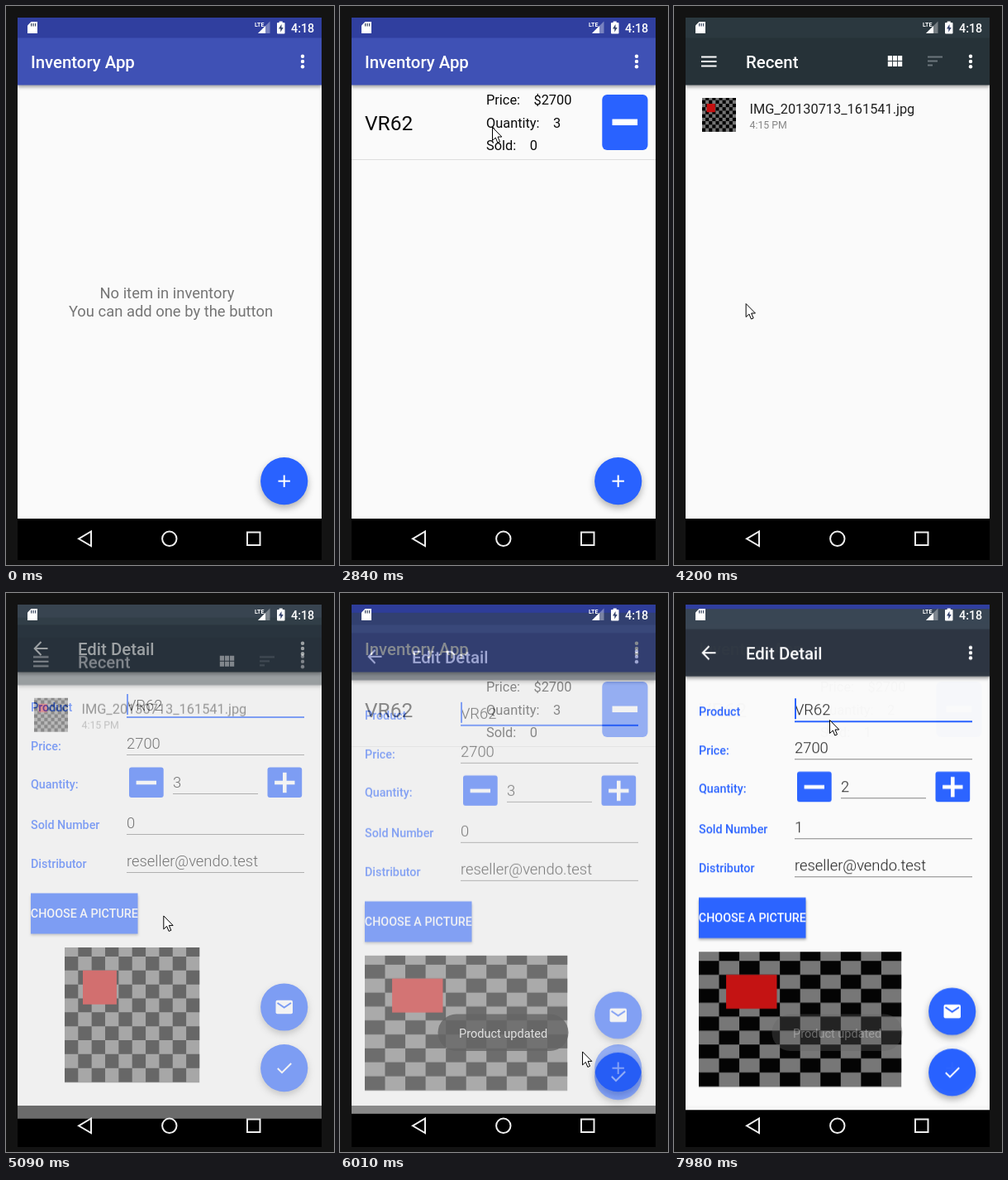
Recreate the animation shown at these times as an HTML page with a canvas. Size 397 px wide and 675 px high, loop 8000 ms.

```html
<!DOCTYPE html>
<html>
<head>
<meta charset="utf-8">
<style>
html, body { margin: 0; height: 100%; overflow: hidden; background: #131313; }
canvas { display: block; }
</style>
</head>
<body>
<canvas id="stage" width="397" height="675"></canvas>
<script>
const LOOP = 8000, BLUE = '#2962ff', PAPER = '#fafafa';
const ITEM = 'VR62', MAIL = 'reseller@vendo.test';
const stage = document.getElementById('stage').getContext('2d');
const buffer = document.createElement('canvas');
buffer.width = 397;
buffer.height = 675;
const layer = buffer.getContext('2d');
let g = stage;

const clamp = v => Math.max(0, Math.min(1, v));
const progress = (t, start, end) => clamp((t - start) / (end - start));
const easeOut = (k, power) => 1 - (1 - k) ** power;
const soldAt = t => t >= 7320 ? 1 : 0;

function rect(x, y, w, h, color, radius = 0) {
  g.fillStyle = color;
  g.beginPath();
  g.roundRect(x, y, w, h, radius);
  g.fill();
}

function disc(x, y, r, color) {
  rect(x - r, y - r, r * 2, r * 2, color, r);
}

function text(str, x, y, size, color, weight = 400, align = 'left') {
  g.font = `${weight} ${size}px Roboto, sans-serif`;
  g.fillStyle = color;
  g.textAlign = align;
  g.fillText(str, x, y);
  return g.measureText(str).width;
}

function fillPath(d, color) {
  g.fillStyle = color;
  g.fill(new Path2D(d));
}

function strokePath(d, color, width = 2) {
  g.strokeStyle = color;
  g.lineWidth = width;
  g.stroke(new Path2D(d));
}

function withShadow(blur, dy, alpha, draw) {
  g.save();
  g.shadowColor = `rgba(0,0,0,${alpha})`;
  g.shadowBlur = blur;
  g.shadowOffsetY = dy;
  draw();
  g.restore();
}

function fab(y) {
  withShadow(8, 4, .3, () => disc(336.7, y, 28.6, BLUE));
}

function minus(x, y, half, thick) {
  rect(x - half, y - thick / 2, half * 2, thick, '#fff');
}

function plus(x, y, half, thick) {
  minus(x, y, half, thick);
  minus(x, y, thick / 2, half * 2);
}

function frame(title, x, status, bar) {
  rect(14, 14, 368, 605, PAPER);
  withShadow(4, 2, .35, () => rect(14, 38, 368, 57.5, bar));
  rect(14, 14, 368, 24.5, status);
  text(title, x, 75, 20.4, '#fff', 500);
  for (let i = -1; i < 2; i++) disc(359, 67 + i * 6.3, 2.2, '#fff');
}

// Checkerboard with a red square; rows are slightly taller than columns
function picture(x, y, w, h) {
  g.save();
  g.beginPath();
  g.rect(x, y, w, h);
  g.clip();
  rect(x, y, w, h, '#757575');
  for (let r = 0; r < 10; r++)
    for (let c = 0; c < 10; c++)
      if ((r + c) % 2) rect(x + c * w / 10, y + (r * 1.03 - .36) * h / 10, w / 10, h * .103, '#000');
  rect(x + w * .135, y + h * .17, w * .25, h * .25, '#c41010');
  g.restore();
}

function listScreen(t) {
  frame('Inventory App', 30, '#303f9f', '#3f51b5');
  if (t < 1800) {
    text('No item in inventory', 195, 353, 18.4, '#757575', 400, 'center');
    text('You can add one by the button', 199.5, 375, 18.4, '#757575', 400, 'center');
  } else {
    const sold = soldAt(t);
    const details = { 'Price:': '$2700', 'Quantity:': 3 - sold, 'Sold:': sold };
    text(ITEM, 30, 150, 24.5, '#0a0a0a');
    Object.entries(details).forEach(([label, value], i) => {
      const y = 119 + i * 27.6;
      const width = text(label, 177, y, 16.35, '#0a0a0a');
      text(value, 177 + width + 16.5, y, 16.35, '#0a0a0a');
    });
    rect(317.3, 107, 55.2, 67, BLUE, 6);
    minus(344.8, 140.3, 15.3, 7.5);
    rect(14, 185, 368, 1, '#dedede');
  }
  fab(573.7);
  plus(336.7, 573.7, 7.2, 2);
}

function editForm(t) {
  const sold = soldAt(t);
  const fields = { Product: ITEM, 'Price:': 2700, 'Quantity:': 3 - sold, 'Sold Number': sold, Distributor: MAIL };
  let y = 143;
  for (const [label, value] of Object.entries(fields)) {
    const counter = label === 'Quantity:', focused = label === 'Product';
    const x = counter ? 202 : 146;
    text(label, 30, y, 14.3, BLUE, 500);
    text(value, x, y - 1.5, 18.4, '#1c1c1c', 300);
    rect(x, Math.round(y + 5.5), counter ? 103 : 215, focused ? 2 : 1, focused ? BLUE : '#858585');
    if (focused) rect(x, y - 21, 2, 25, BLUE);
    if (counter) {
      for (const left of [149, 316.5]) rect(left, y - 25.5, 41.7, 36.5, BLUE, 3);
      minus(169.8, y - 7, 12.2, 4.6);
      plus(337.3, y - 7, 12.2, 4.6);
    }
    y += counter ? 49 : 46.5;
  }
}

function editScreen(t) {
  frame('Edit Detail', 87, '#3a4753', '#2d3541');
  strokePath('M50.5 67H35M42.5 59L34.7 67L42.5 75', '#fff');
  editForm(t);
  withShadow(3, 2, .3, () => rect(30, 362.5, 129.5, 49, BLUE));
  text('CHOOSE A PICTURE', 94.8, 392.3, 14.3, '#fff', 500, 'center');
  const width = t >= 5850 ? 245.5 : 163.5;
  if (t >= 4930) picture(152.7 - width / 2, 428, width, 163.5);
  fab(500);
  rect(326.5, 491.8, 20.5, 16.4, '#fff', 2);
  strokePath('M328.5 495L336.7 500.5L345 495', BLUE);
  fab(573.7);
  strokePath('M328.8 574L334 579.2L345.2 568', '#fff');
}

function pickerScreen() {
  frame('Recent', 87, '#2b383f', '#263238');
  for (let i = 0; i < 3; i++) {
    rect(33, 60.5 + i * 5.5, 18.5, 2, '#fff');
    rect(307, 60.5 + i * 5, 18 - i * 6, 2, '#6c767c');
    for (let j = 0; j < 2; j++) rect(258.8 + i * 6.1, 60 + j * 7, 5.2, 6, '#fff');
  }
  picture(34, 111, 41, 41);
  text('IMG_20130713_161541.jpg', 91.5, 130, 16.35, '#212121');
  text('4:15 PM', 91.5, 148, 12.3, '#858585');
}

function menu(t) {
  const open = easeOut(progress(t, 1100, 1330), 2);
  const alpha = open * (1 - progress(t, 1700, 1840));
  if (!alpha) return;
  g.save();
  g.globalAlpha = alpha;
  g.beginPath();
  g.rect(388 - 220 * open, 34, 220, 24 + 106 * open);
  g.clip();
  withShadow(10, 5, .35, () => rect(177.5, 42, 200.5, 98.5, PAPER, 2));
  text('Insert dummy data', 193.7, 73, 16.35, '#212121');
  text('Delete All', 193.7, 122, 16.35, '#212121');
  g.restore();
}

// A window slides up while fading in, and sinks while fading out
function windowLayer(draw, t, start, end) {
  if (t < start || t > end + 250) return;
  const out = progress(t, end, end + 250);
  g = layer;
  g.clearRect(0, 0, 397, 675);
  draw(t);
  g = stage;
  g.globalAlpha = easeOut(progress(t, start, start + 200), 4) * (1 - out);
  g.drawImage(buffer, 0, 52 * (1 - easeOut(progress(t, start, start + 350), 5)) + 48 * out * out);
  g.globalAlpha = 1;
  if (out > 0 && out < 1) rect(14, 14, 368, 605, 'rgba(0,0,0,.04)');
}

function toast(t) {
  g.globalAlpha = progress(t, 5900, 6040) * (1 - progress(t, 7880, 8030));
  rect(118.5, 508.5, 158, 44.5, '#646464', 22.3);
  text('Product updated', 197.6, 537, 14.5, '#fff', 400, 'center');
  g.globalAlpha = 1;
}

function systemIcons() {
  fillPath('M30.5 19H38V33H26V23.5Z', '#fff');
  for (let i = 0; i < 3; i++) rect(30 + i * 2.5, 21, 1.3, 3.5, '#46536a');
  text('LTE', 301, 25, 7, '#fff', 700);
  fillPath('M305 33H319.5V18.5Z', 'rgba(255,255,255,.35)');
  fillPath('M305 33H314V24Z', '#fff');
  rect(328, 20, 9.5, 13.5, '#fff', 1);
  rect(330.7, 18.5, 4, 2, '#fff');
  fillPath('M333.5 22L330 27.5H332.3V31.5L335.7 26H333.5Z', '#35436e');
  text('4:18', 345, 31.5, 14.3, '#fff', 500);
  strokePath('M88 643.3L103 634.5V652Z', '#eee');
  strokePath('M206.5 643.3a8.7 8.7 0 1 0 -17.4 0a8.7 8.7 0 1 0 17.4 0Z', '#eee');
  strokePath('M292 635.5h15.5v15.5h-15.5Z', '#eee');
}

// Pointer strokes: start time, end time, x, y reached
const MOVES = [
  [0, 700, 358, 26], [740, 890, 364, 58], [1180, 1400, 307, 61], [1600, 2340, 184, 146],
  [2960, 3190, 140, 223], [3190, 3610, 90, 384], [4150, 4650, 57, 139],
  [4900, 5090, 190, 389], [5090, 5530, 330, 570], [5850, 6010, 293, 554],
  [6010, 6740, 328, 136], [6970, 7130, 336, 140], [7320, 7580, 192, 155], [7810, 7980, 188, 153]
];

function pointer(t) {
  let x = 238, y = 680;
  for (const [start, end, toX, toY] of MOVES) {
    const k = progress(t, start, end);
    x += (toX - x) * k;
    y += (toY - y) * k;
  }
  const arrow = 'M0 0V16L3.8 12.5L6.3 18.5L9 17.4L6.5 11.5H11.3Z';
  g.save();
  g.translate(x + .5, y + .5);
  fillPath(arrow, '#fff');
  strokePath(arrow, '#000', 1);
  g.restore();
}

function render() {
  const t = performance.now() % LOOP;
  rect(0, 0, 397, 675, '#131313');
  rect(14, 14, 368, 655, '#000');
  g.save();
  g.beginPath();
  g.rect(14, 14, 368, 655);
  g.clip();
  listScreen(t);
  menu(t);
  windowLayer(editScreen, t, 2890, 5898);
  windowLayer(pickerScreen, t, 3800, 4948);
  windowLayer(editScreen, t, 7852, LOOP);
  toast(t);
  systemIcons();
  g.restore();
  pointer(t);
  requestAnimationFrame(render);
}
render();
</script>
</body>
</html>
```
